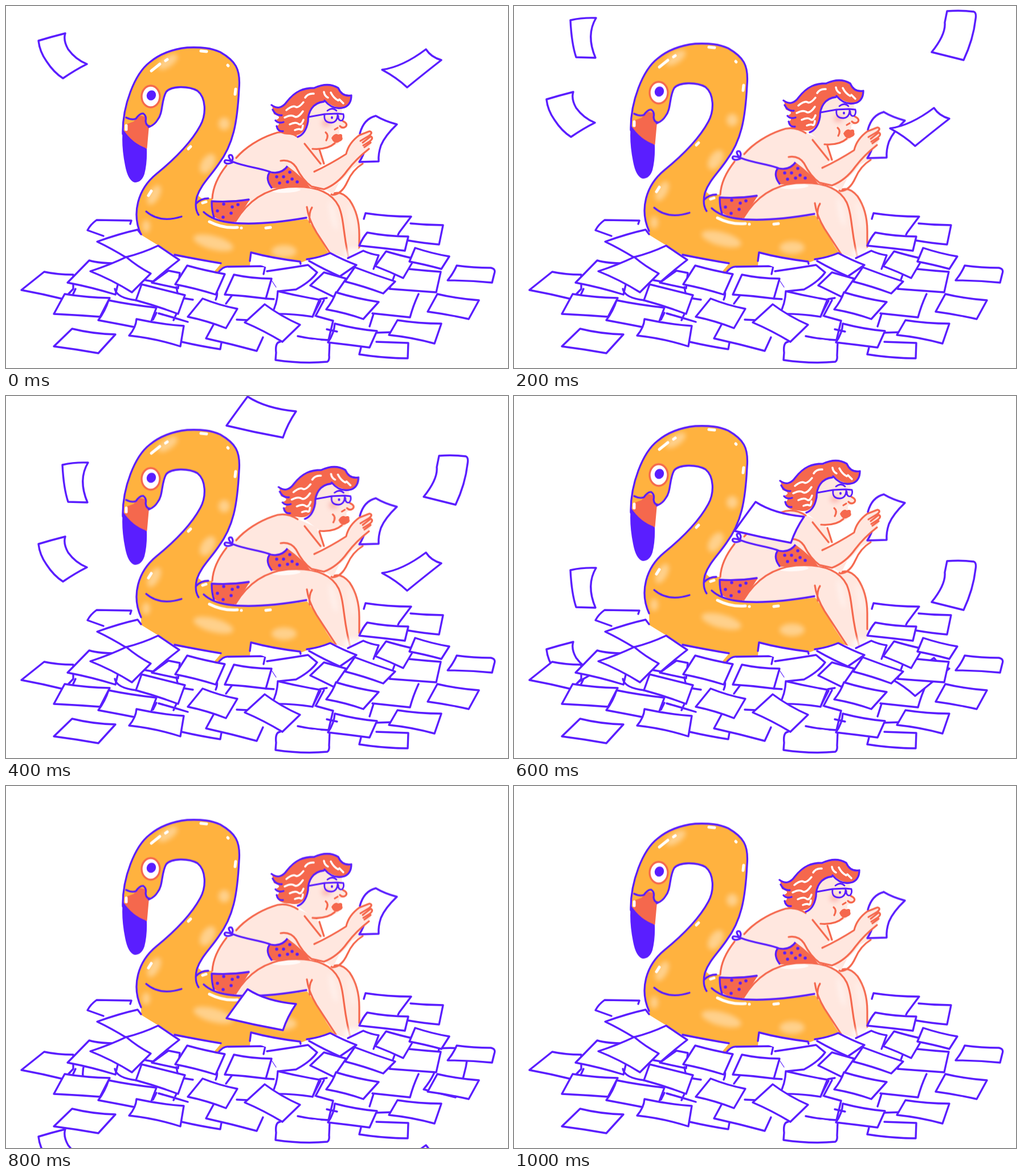
Recreate the animation shown at these times as an HTML page. Size 881x636 px, loop 1200 ms.

```html
<!DOCTYPE html>
<html lang="en">
<head>
<meta charset="utf-8">
<title>Paper pool</title>
<style>
html, body { margin: 0; width: 100%; height: 100%; overflow: hidden; background: #fff; }
svg { display: block; width: 100%; height: 100%; }
path, ellipse { stroke-linecap: round; stroke-linejoin: round; }
.sheet path { fill: #fff; stroke: #5a1eff; stroke-width: 3.4; }
.sheet .fill { stroke: none; }
.sheet .line { fill: none; }
.ink { fill: none; stroke: #5a1eff; stroke-width: 3.3; }
.red { fill: none; stroke: #f5684d; stroke-width: 3.2; }
.shine { fill: none; stroke: #fff; stroke-width: 5; }
.soft { fill: #fff; opacity: .4; filter: url(#blur); }
.skin { fill: #ffe7df; }
.coral { fill: #f5684d; }
.blue { fill: #5a1eff; }
.gold { fill: #ffb23f; }
.bob, .nod, .fall { animation: bob 1.2s step-end infinite; }
.nod { animation-name: nod; }
.fall { animation-name: fall; }
@keyframes bob {
  0%, 100% { transform: translateY(0); }
  16.66%, 83.33% { transform: translateY(-6.7px); }
  33.33%, 66.66% { transform: translateY(-13.4px); }
  50% { transform: translateY(-20.2px); }
}
@keyframes nod {
  0%, 100% { transform: translate(0, 0); }
  16.66% { transform: translate(7px, -8px); }
  33.33% { transform: translate(12.5px, -14px); }
  50% { transform: translate(1px, -25px); }
  66.66% { transform: translate(0, -19.5px); }
  83.33% { transform: translate(0, -9px); }
}
@keyframes fall {
  0%, 100% { transform: translateY(0); }
  16.66% { transform: translateY(103px); }
  33.33% { transform: translateY(199px); }
  50% { transform: translateY(384px); }
  66.66% { transform: translateY(555px); }
  83.33% { transform: translateY(900px); }
}
</style>
</head>
<body>
<svg viewBox="0 0 881 636" preserveAspectRatio="none">
<defs>
  <filter id="blur" x="-60%" y="-60%" width="220%" height="220%"><feGaussianBlur stdDeviation="4"/></filter>
  <clipPath id="above"><path d="M0 0H881V425H621L602 443L569 434L530 446L517 451L430 434L428 457H387L372 470L365 467L377 453L300 440L268 421L237 402H0Z"/></clipPath>
</defs>

<g clip-path="url(#above)">
  <!-- float -->
  <g class="bob">
    <path class="gold" d="M207 205C207 165 228 118 252 99C270 84 290 76 318 73C345 72 360 74 376 81C402 96 411 112 409 145C406 205 399 243 373 278C358 299 343 316 336 332L343 338L362 338L366 375C415 388 480 380 528 373L560 420L600 475V530H240L237 402C220 365 231 322 264 295C302 264 327 236 341 210C352 190 349 161 336 149C320 140 290 140 281 151C272 167 276 188 266 200C260 210 252 212 248 214L246 250L207 222Z"/>
    <g class="soft">
      <ellipse cx="284" cy="98" rx="20" ry="9" transform="rotate(-35 284 98)"/>
      <ellipse cx="383" cy="207" rx="10" ry="11"/>
      <ellipse cx="354" cy="277" rx="11" ry="19" transform="rotate(32 354 277)"/>
      <ellipse cx="260" cy="332" rx="9" ry="19" transform="rotate(28 260 332)"/>
      <ellipse cx="246" cy="387" rx="7" ry="11"/>
      <ellipse cx="364" cy="416" rx="36" ry="12" transform="rotate(15 364 416)"/>
      <ellipse cx="488" cy="431" rx="22" ry="11"/>
    </g>
    <path class="shine" d="M255 114L270 102M280 96L283 94M342 79L352 80M389 104L390 105M403 146L402 155M320 251L324 247M250 333L255 325M345 346L351 344"/>
    <path class="shine" d="M357 379Q380 391 406 389M413 390H413.1M456 390L464 389"/>
    <path class="coral" d="M208 221L213 207L224 203L234 192L245 195L248 212L246 251Q222 242 208 221Z"/>
    <path class="blue" d="M205 216Q222 242 247 250Q248 275 243 295Q238 310 226 310Q214 307 209 280Q202 245 205 216Z"/>
    <path class="shine" stroke-width="7" d="M211 210L211 217"/>
    <path class="ink" d="M205 225C204 175 226 119 252 99C270 84 290 76 318 73C345 72 360 74 376 81C402 96 412 110 409 145C406 205 399 243 373 278C358 300 342 314 335 335Q330 355 338 367M237 402C220 365 231 322 264 295C302 264 327 236 341 210C352 190 351 161 336 149C320 140 290 140 281 151C272 167 276 188 266 200C260 210 254 211 250 213M211 196Q221 201 228 198Q235 188 241 189Q247 193 245 202Q246 211 252 211"/>
    <path class="red" d="M249 215L246 249"/>
    <ellipse cx="254" cy="159" rx="16" ry="19" fill="#fff" stroke="#f5684d" stroke-width="3.3"/>
    <ellipse class="blue" cx="255" cy="157" rx="8" ry="9" transform="rotate(25 255 157)"/>
    <path class="ink" d="M246 361Q270 382 308 370M334 347Q342 338 355 338"/>
  </g>

  <!-- reader -->
  <g class="bob">
    <path class="skin" d="M571 331Q590 321 606 345Q621 368 620 400V470H590Z"/>
    <path class="red" d="M571 331Q587 322 603 341Q620 366 620 402V430"/>
    <path class="skin" d="M362 342C362 320 373 295 390 277C405 257 440 233 470 224Q490 216 513 230L545 244L558 277L540 291L536 322L425 345Z"/>
    <path class="coral" d="M361 343L428 340L402 381Q375 378 364 369Z"/>
    <path class="coral" d="M462 293Q478 295 495 281Q516 294 534 319L466 320Q455 304 462 293Z"/>
    <path class="skin" d="M401 380C420 346 450 321 495 318C540 315 573 326 586 352C595 378 594 400 606 444L605 480L590 470L562 428L533 374Q480 380 440 381Z"/>
    <ellipse cx="492" cy="324" rx="25" ry="4" fill="#fff" opacity=".8" transform="rotate(-3 492 324)"/>
    <g class="soft">
      <ellipse cx="574" cy="368" rx="5" ry="26" transform="rotate(-12 574 368)"/>
      <ellipse cx="607" cy="375" rx="4" ry="26" transform="rotate(-10 607 375)"/>
    </g>
    <path class="red" d="M362 338C363 320 372 299 387 280M404 267C420 248 445 233 468 225Q490 216 512 230M403 378C423 345 453 322 495 318C540 315 571 326 584 352C595 378 591 410 606 460M528 353Q531 375 545 398L590 467M537 354Q531 363 533 380M524 242L552 277M550 252L558 277"/>
    <path class="ink" d="M361 343Q395 345 426 340M361 344Q361 360 365 371M347 362Q362 376 390 380Q440 387 527 372M399 274C421 283 446 284 465 292Q484 296 495 280M462 293Q455 304 466 319M396 273Q386 260 396 262Q400 267 396 273Q381 268 384 275Q388 279 397 275"/>
    <path class="ink" style="stroke-width:5.5" d="M382 348h.1M397 353h.1M371 360h.1M407 349h.1M381 371h.1M395 364h.1M475 300h.1M487 300h.1M498 292h.1M480 311h.1M494 309h.1M502 304h.1M511 309h.1"/>

    <path class="skin" d="M561 323Q590 311 607 285L625 276L638 254L615 250L574 331Z"/>
    <path class="red" d="M573 332Q589 331 599 309Q608 288 626 277"/>
    <g class="sheet"><path d="M621 224Q628 198 649 193Q664 202 686 208Q665 228 658 245Q653 260 654 273L620 274Q628 262 632 245Z"/></g>
    <path class="skin" d="M482 272Q499 269 510 282L541 291L599 261Q600 242 612 232L634 219Q643 218 641 235Q642 244 634 252Q610 278 592 302Q580 314 561 322L534 319Q520 300 495 282Z"/>
    <path class="red" d="M482 272Q499 269 509 283Q521 307 536 317L558 322Q582 313 599 289Q614 269 637 251M541 291Q569 278 597 260Q601 241 620 227L638 220Q645 222 637 228L622 237M626 240L640 229Q646 232 638 238L627 245M629 248L640 240"/>
  </g>
  <ellipse cx="608" cy="436" rx="15" ry="11" fill="#fff" opacity=".7" filter="url(#blur)"/>

  <!-- head -->
  <g class="nod">
    <path class="skin" d="M527 190L545 162L588 168L591 202Q600 207 595 213L585 218L585 240Q568 252 540 252L510 229Z"/>
    <ellipse cx="562" cy="206" rx="8" ry="6" fill="#f56a62" opacity=".4" filter="url(#blur)"/>
    <path class="coral" d="M467 175Q480 185 493 168C508 149 522 145 543 145Q565 133 583 144Q590 158 606 156Q607 171 594 178Q576 181 560 166C543 170 531 184 530 203Q523 232 498 226Q477 226 474 212Q484 207 474 200Q486 195 470 190Z"/>
    <path class="ink" d="M466 174Q481 185 493 168C508 149 522 144 541 144Q565 133 583 144Q590 160 606 157Q606 173 594 178Q574 184 559 166M468 182Q473 193 484 192M473 201Q478 207 487 204M475 211Q477 221 486 220M558 168C538 170 530 186 530 203Q526 225 512 230"/>
    <path class="shine" style="stroke-width:3.5" d="M492 183Q503 174 508 177T522 169M525 161Q530 153 540 154M489 196Q500 190 506 194T521 185M498 208Q508 203 513 207T522 200M507 218Q514 215 517 217T521 210M558 151Q559 158 565 161M570 152Q575 162 583 166M585 164L592 171"/>
    <path class="red" d="M591 202Q601 207 596 212Q591 216 586 211M577 217L582 214M561 222Q567 227 562 236M538 251Q564 253 577 241"/>
    <path class="coral" d="M571 232Q577 222 583 226Q591 223 590 230Q593 236 584 239Q576 244 571 232Z"/>
    <path class="ink" style="stroke-width:2.8" d="M531 195L559 190L581 189L592 190M559 191Q557 205 571 205Q582 204 582 190M583 193Q583 203 590 201Q594 196 592 190M564 184Q573 177 580 184"/>
    <ellipse class="blue" cx="572" cy="196" rx="2" ry="2.5"/>
  </g>
</g>

<!-- sheets under the falling ones -->
<g class="sheet">
  <path d="M643 540L709 547Q715 525 724 506"/>
</g>

<g class="fall sheet">
  <path d="M57 61Q80 54 104 48Q100 60 109 76Q122 94 142 102Q122 112 100 127Q84 117 71 97Q59 80 57 61Z"/>
  <path d="M660 112Q696 107 737 76Q746 90 764 95Q737 116 704 143Q686 126 660 112Z"/>
  <g transform="translate(0 -103)">
    <path d="M99 25Q120 20 144 21Q126 51 143 91L109 90Q101 66 99 25Z"/>
    <path d="M760 9Q785 7 807 10Q812 12 810 23Q806 59 789 95L733 81Q758 50 756 29Z"/>
  </g>
  <path transform="translate(0 -199)" d="M424 1Q456 22 509 27Q494 49 486 73Q436 64 387 52Q404 28 424 1Z"/>
</g>

<!-- pool of paper -->
<g class="sheet">
  <path d="M171 404L143 394Q148 384 159 376L220 377L218 383"/>
  <path d="M237 401L231 393Q199 400 160 414Q185 426 211 442"/>
  <path d="M628 374L631 364Q670 370 711 370L690 398L688 402"/>
  <path d="M710 382Q738 385 767 385L760 419Q735 417 706 412"/>
  <path d="M620 421Q626 407 634 398Q670 405 706 405L700 430Q659 425 620 421Z"/>
  <path d="M600 443L627 430Q640 436 654 438L645 462"/>
  <path class="line" d="M296 437Q340 446 377 452"/>
  <path class="fill" d="M384 457L455 457L452 472L440 490H374L371 471Z"/>
  <path class="line" d="M372 469Q381 457 390 458L455 457L452 471"/>
  <path class="fill" d="M428 448L430 433Q467 443 516 449L517 455L460 460Z"/>
  <path class="line" d="M428 448L430 433Q467 443 516 449L517 453"/>
  <path d="M208 442Q240 434 267 421L304 446Q282 463 258 484L235 480"/>
  <path d="M285 465L305 469L302 496L256 486Z"/>
  <path d="M27 499L67 467Q90 472 118 472L118 497L101 515Q65 506 27 499Z"/>
  <path d="M108 486L146 447Q166 453 205 452L192 507Q150 494 108 486Z"/>
  <path class="line" d="M116 510L122 497M191 497Q194 513 229 517"/>
  <path d="M148 466Q182 455 211 441Q231 458 254 470L221 503Q186 481 148 466Z"/>
  <path d="M162 552Q174 536 180 517Q219 525 264 530L250 567L240 567Q200 559 162 552Z"/>
  <path d="M84 541L103 506Q140 512 182 513L165 546Q125 543 84 541Z"/>
  <path class="line" d="M264 539L258 551M268 540Q293 547 319 555M302 512L328 516M299 541L294 552M299 494L301 504"/>
  <path d="M228 517L238 489Q278 499 314 508L302 541Q265 527 228 517Z"/>
  <path class="line" d="M366 495Q374 502 368 516"/>
  <path d="M297 489L318 456Q350 465 384 471L368 507Q333 496 297 489Z"/>
  <path class="line" d="M386 523L397 508M405 551L425 552M456 514L470 515"/>
  <path class="fill" d="M458 463Q500 461 530 454L546 468Q535 484 509 498L480 503L466 490Z"/>
  <path class="line" d="M458 466Q500 460 530 455L546 468Q535 484 509 498M480 501L509 498"/>
  <path class="line" style="stroke-width:1.2" d="M466 482L474 494"/>
  <path d="M384 507L400 472Q432 479 466 479L456 514Q420 509 384 507Z"/>
  <path d="M534 491L558 468L597 479L575 511Q553 500 534 491Z"/>
  <path class="fill" d="M530 447Q550 442 569 434Q591 446 615 455L586 475Q560 459 530 447Z"/>
  <path class="line" d="M528 445Q550 442 569 434Q591 446 615 455L586 475Q560 464 532 448"/>
  <path d="M673 497Q715 500 755 503L763 467Q735 465 706 462L683 470Z"/>
  <path d="M595 484L612 459Q648 473 683 484L662 505Q630 493 595 484Z"/>
  <path d="M648 457L667 431Q690 438 717 444L697 478Q674 467 648 457Z"/>
  <path d="M708 449L718 425Q748 435 778 440L764 462Q735 454 708 449Z"/>
  <path d="M775 482Q785 470 791 456Q820 460 851 460Q860 462 857 470L853 486Q815 482 775 482Z"/>
  <path d="M740 537L757 506Q790 514 830 517L812 550Q777 542 740 537Z"/>
  <path class="line" d="M551 515L563 513M558 517L543 545M552 518L539 543M645 541L638 563M649 574L680 573"/>
  <path class="fill" d="M503 550L550 545L574 553L566 587L502 580Z"/>
  <path class="line" d="M545 545L574 553L566 587Q540 586 512 580"/>
  <path d="M466 541Q476 524 477 501Q514 510 550 516L538 546Q502 540 466 541Z"/>
  <path d="M562 533Q574 518 579 503Q615 514 654 520L627 550Q596 539 562 533Z"/>
  <path class="fill" d="M310 589Q343 598 376 603L378 588L352 572L314 565Z"/>
  <path class="line" d="M308 590Q343 598 376 603L378 592"/>
  <path class="fill" d="M364 560L351 584Q396 594 440 606L452 583L425 553Z"/>
  <path class="line" d="M364 560L351 584Q396 594 440 606L451 582"/>
  <path d="M319 546L345 514Q375 526 406 532L386 566Q353 553 319 546Z"/>
  <path d="M216 579Q228 565 229 550Q270 559 312 562L306 598Q263 584 216 579Z"/>
  <path class="fill" d="M475 609L474 592L473 621Q474 626 482 625Q530 629 566 624L568 590L540 586Z"/>
  <path class="line" d="M481 590Q472 591 474 609L473 622Q520 629 564 625Q568 622 567 614L568 591"/>
  <path d="M419 556L454 524Q482 545 516 560L485 590Q452 570 419 556Z"/>
  <path d="M623 600L620 612Q663 619 705 619L706 592L650 590"/>
  <path d="M565 591Q576 575 577 558Q615 568 651 571L638 600Q600 595 565 591Z"/>
  <path class="line" d="M563 568L581 572"/>
  <path d="M672 578L687 552Q725 558 764 558L752 593Q712 582 672 578Z"/>
  <path d="M84 598L116 567Q152 576 192 577L162 610Q123 603 84 598Z"/>
</g>
</svg>
</body>
</html>
```
